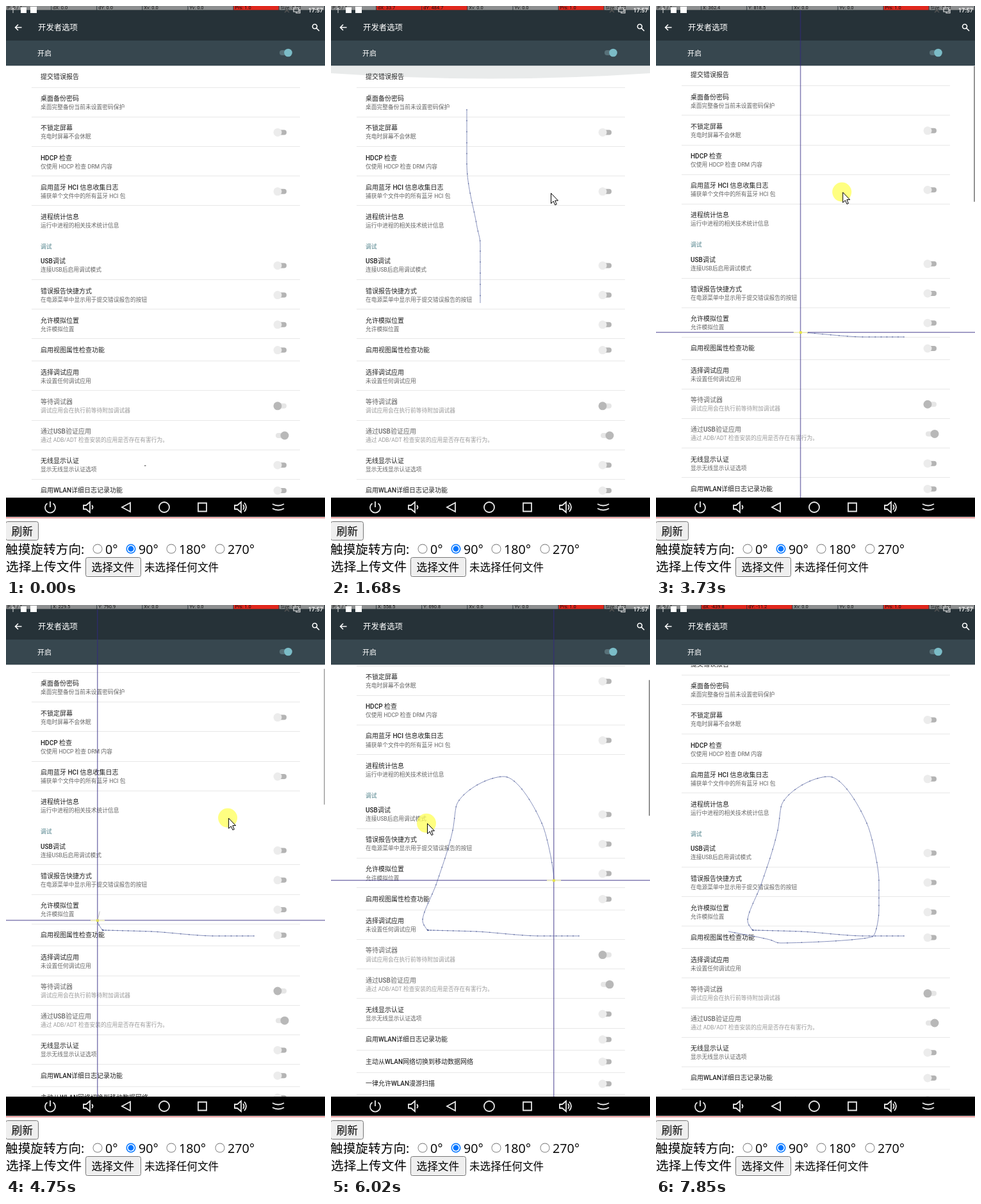
Recreate the animation shown at these times as an HTML page with a canvas. Size 498 by 892 pixels, loop 8.19 s.

```html
<!DOCTYPE html>
<html lang="zh-CN">
<head>
<meta charset="utf-8">
<style>
html, body { margin: 0; width: 100%; height: 100%; overflow: hidden; background: #fff; }
canvas { display: block; }
</style>
</head>
<body>
<canvas id="stage" width="498" height="892"></canvas>
<script>
const ctx = document.getElementById('stage').getContext('2d');
const LOOP = 8190, W = 498, H = 892;
const TOP = 92.6, ROW = 46.2, SHORT_ROW = 34.6, CATEGORY = 23.2;
const UI = 'Roboto, "Noto Sans CJK SC", "Noto Sans CJK", sans-serif';
const PAGE = '"Open Sans", "Noto Sans CJK SC", "Noto Sans CJK", sans-serif';

// Title, subtitle, switch; a lone string is a category
const items = [
  ['提交错误报告'],
  ['桌面备份密码', '桌面完整备份当前未设置密码保护'],
  ['不锁定屏幕', '充电时屏幕不会休眠', 'off'],
  ['HDCP 检查', '仅使用 HDCP 检查 DRM 内容'],
  ['启用蓝牙 HCI 信息收集日志', '捕获单个文件中的所有蓝牙 HCI 包', 'off'],
  ['进程统计信息', '运行中进程的相关技术统计信息'],
  '调试',
  ['USB调试', '连接USB后启用调试模式', 'off'],
  ['错误报告快捷方式', '在电源菜单中显示用于提交错误报告的按钮', 'off'],
  ['允许模拟位置', '允许模拟位置', 'off'],
  ['启用视图属性检查功能', '', 'off'],
  ['选择调试应用', '未设置任何调试应用'],
  ['等待调试器', '调试应用会在执行前等待附加调试器', 'wait'],
  ['通过USB验证应用', '通过 ADB/ADT 检查安装的应用是否存在有害行为。', 'on'],
  ['无线显示认证', '显示无线显示认证选项', 'off'],
  ['启用WLAN详细日志记录功能', '', 'off'],
  ['主动从WLAN网络切换到移动数据网络', '', 'off'],
  ['一律允许WLAN漫游扫描', '', 'off'],
  ['日志记录器缓冲区大小', '每个日志缓冲区256K'],
  '输入',
  ['显示触摸操作', '为触摸操作提供视觉反馈', 'off']
];

// Finger strokes as key points: time, x, y
const pull = [
  [700, 212, 162], [920, 212, 245], [1220, 228, 345], [1300, 233, 372], [1540, 233, 464]
];
const loop = [
  [3050, 387, 517], [3350, 326, 517], [3730, 226, 510], [4230, 151, 508],
  [4650, 151, 508], [4750, 143, 493], [4950, 165, 434], [5210, 190, 352],
  [5320, 197, 310], [5640, 270, 268], [5890, 330, 343], [6020, 348, 430],
  [6180, 348, 477], [6290, 338, 518], [6590, 194, 528], [6660, 178, 523],
  [6860, 113, 510]
];
const LAG = 95; // the device follows the mouse this late

const clamp = (v, a, b) => Math.max(a, Math.min(b, v));
const mix = (a, b, k) => a + (b - a) * k;
const first = keys => keys[0][0];
const last = keys => keys[keys.length - 1][0];

// Smooth interpolation that never overshoots its keys
function at(keys, t) {
  t = clamp(t, first(keys), last(keys));
  let i = 1;
  while (t > keys[i][0]) i++;
  const [a, b] = [keys[i - 1], keys[i]];
  const h = b[0] - a[0], k = (t - a[0]) / h;
  return [1, 2].map(axis => {
    const slope = n => {
      n = clamp(n, 1, keys.length - 1);
      return (keys[n][axis] - keys[n - 1][axis]) / (keys[n][0] - keys[n - 1][0]);
    };
    const tangent = n => {
      const p = slope(n), q = slope(n + 1);
      return p * q > 0 ? 2 * p * q / (p + q) : 0;
    };
    const bend = (1 - k) * (tangent(i - 1) * h * (1 - k) - tangent(i) * h * k);
    return mix(a[axis], b[axis], k * k * (3 - 2 * k)) + k * bend;
  });
}

function box(x, y, w, h, color) {
  ctx.fillStyle = color;
  ctx.fillRect(x, y, w, h);
}

function disc(x, y, r, color) {
  ctx.fillStyle = color;
  ctx.beginPath();
  ctx.arc(x, y, r, 0, 7);
  ctx.fill();
}

function line(path, color, width) {
  ctx.strokeStyle = color;
  ctx.lineWidth = width;
  ctx.stroke(new Path2D(path));
}

function pill(x, y, w, h, r, fill, border) {
  const path = new Path2D();
  path.roundRect(x, y, w, h, r);
  ctx.fillStyle = fill;
  ctx.fill(path);
  if (border) line(path, border, 1);
}

// y is the vertical middle of the glyphs
function text(s, x, y, size, color, weight = 400, family = UI) {
  ctx.font = `${weight} ${size}px ${family}`;
  ctx.fillStyle = color;
  ctx.fillText(s, x, y + size * 0.37);
}

function clipped(x, y, w, h, paint) {
  ctx.save();
  ctx.beginPath();
  ctx.rect(x, y, w, h);
  ctx.clip();
  paint();
  ctx.restore();
}

function toggle(y, state) {
  const off = state === 'off';
  pill(421, y - 4, 17, 8, 4, off ? '#b4b4b4' : '#e6e6e6');
  disc(state === 'on' ? 435 : 424, y, 6.5, off ? '#ececec' : '#b8b8b8');
}

function list(scroll) {
  let y = TOP - scroll;
  items.forEach((item, i) => {
    if (typeof item === 'string') {
      text(item, 54, y + 17.5, 8.75, '#4c7f88', 500);
      y += CATEGORY;
      return;
    }
    const [title, sub, state] = item;
    const dim = state === 'wait' || state === 'on';
    text(title, 54, y + 17.2, 10, dim ? '#666' : '#222', 500);
    if (sub) text(sub, 54, y + 30.7, 8.75, dim ? '#999' : '#666');
    if (state) toggle(y + (sub ? 24 : 17.6), state);
    y += sub ? ROW : SHORT_ROW;
    if (Array.isArray(items[i + 1])) box(40, Math.round(y - 0.5), 419, 1, '#e8e8e8');
  });
}

function header() {
  box(0, 0, W, 54, '#263238');
  box(0, 54, W, 39, '#37474f');
  box(0, 93, W, 1, '#c4c8ca');
  line('M24.500 33.500H15M19 29l-4.500 4.500 4.500 4.500', '#fff', 1.5);
  text('开发者选项', 50, 33, 12.4, '#fff', 500);
  text('开启', 49, 73.5, 11, '#fff', 500);
  line('M485.500 32a3.500 3.500 0 1 1-7 0a3.500 3.500 0 1 1 7 0M484.500 34.500l4.500 4.500', '#fff', 1.6);
  pill(427, 69, 16, 8, 4, '#587179');
  disc(440.5, 73, 6.3, '#7bbcc7');
}

function status(stroke, now, touching) {
  const value = axis => {
    const from = stroke && !touching ? stroke[0][axis + 1] : 0;
    return (touching ? '' : 'd') + 'XY'[axis] + ': ' + ((now[axis] - from) * 1.605).toFixed(1);
  };
  const cells = [`P: ${+touching} / 1`, value(0), value(1),
    'Xv: 0.0', 'Yv: 0.0', 'Prs: 1.0', 'Size: 0.02'];
  const released = stroke && !touching;
  clipped(0, 0, W, 6.5, () => cells.forEach((s, i) => {
    const red = i === 5 || (released && (i === 1 || i === 2));
    box(i * 71.1, 0, 70.2, 6.5, red ? '#e0281e' : '#8d8f90');
    text(s, i * 71.1 + 2, 2.2, 7.5, '#111');
  }));
  line('M11 3v8M8.500 6l2.500-3 2.500 3', '#ddd', 1);
  box(23, 2, 9, 9, '#fff');
  box(38, 1, 10, 10, '#fff');
  line('M435 4l7 6M442 4l-7 6', '#555', 1.5);
  line('M449 3h8v6h-8zM453 9v2h6V5', '#e4e4e4', 1.2);
  text('17:57', 472, 6.5, 9, '#fff', 500);
}

function navBar() {
  box(0, 768, W, 30, '#000');
  line('M64.500 777a8 8 0 1 0 9 0M69 774v9' +
    'M121 780h4l6-5v16l-6-5h-4zM134 780q3 3 0 6' +
    'M194 776v14l-13-7z' +
    'M255 783a8 8 0 1 1-16 0a8 8 0 1 1 16 0' +
    'M300 776.500h13v13h-13z' +
    'M357 780h4l6-5v16l-6-5h-4zM370 779q3 4 0 8M372 776q6 7 0 14' +
    'M416 778q9 5 18 0M416 785q9 5 18 0', '#e8e8e8', 1.8);
}

function form() {
  const put = (s, x, y, size = 19.7) => text(s, x, y, size, '#000', 400, PAGE);
  const button = (s, x, y, w, h, size) => {
    pill(x, y, w, h, 3, '#efefef', '#767676');
    put(s, x + 9, y + h / 2 + 0.3, size);
  };
  const radio = (s, x, on) => {
    disc(x, 848, 7.5, on ? '#0075ff' : '#767676');
    disc(x, 848, on ? 6 : 6.6, '#fff');
    if (on) disc(x, 848, 4.4, '#0075ff');
    put(s, x + 12, 849);
  };
  box(0, 798, W, 94, '#fff');
  box(0, 799, W, 1, '#d04848');
  button('刷新', -0.5, 805.5, 51, 29, 16.8);
  put('触摸旋转方向:', -1, 849);
  radio('0°', 143);
  radio('90°', 195, true);
  radio('180°', 258);
  radio('270°', 334);
  put('选择上传文件', 0, 876);
  button('选择文件', 124.5, 861.5, 86, 30, 16.7);
  put('未选择任何文件', 216, 877, 16.6);
}

// Overscroll glow grows with the pull and fades after release
function glow(t) {
  const drag = clamp((at(pull, t)[1] - 162) / 120, 0, 1);
  const amount = drag * clamp((2200 - t) / 500, 0, 1);
  ctx.fillStyle = 'rgba(55,71,79,.11)';
  ctx.fill(new Path2D(`M0 93v${12 * amount}Q249 ${93 + 29 * amount} ${W} ${93 + 12 * amount}V93z`));
}

function scrollbar(t, scroll) {
  const fade = (from, to) => clamp((t - from) / 150, 0, 1) * clamp((to - t) / 180, 0, 1);
  const alpha = Math.max(fade(3400, 4440), fade(4650, 7400));
  box(496, 93 + scroll * 0.31, 2, 212, `rgba(150,150,150,${alpha})`);
}

function trace(keys, t) {
  const path = new Path2D(), end = Math.min(t, last(keys));
  for (let s = first(keys); s < end; s += 15) path.lineTo(...at(keys, s));
  path.lineTo(...at(keys, end));
  line(path, '#8791bd', 1);
  for (let s = first(keys); s <= end; s += 45) {
    const [x, y] = at(keys, s);
    box(x - 0.7, y - 0.7, 1.4, 1.4, '#5c689c');
  }
}

function crosshair([x, y], [aheadX, aheadY]) {
  const color = 'rgba(50,40,130,.6)';
  box(x - 1, 7, 1.5, 761, color);
  box(0, y - 1, W, 1.5, color);
  box(x - 11, y - 1, 22, 2, '#f0efc0');
  box(x - 2, y - 2, 4, 4, '#e6e34a');
  if (aheadY < y - 10) line(`M${x} ${y}L${aheadX} ${aheadY}`, '#bbb', 1);
}

// The mouse drags on a view turned by half a circle
function mouse(t) {
  const turned = (keys, time) => {
    const [x, y] = at(keys, time);
    return [W - x, 800 - y];
  };
  const drag = t + LAG;
  if (drag > first(loop)) {
    const from = turned(loop, drag);
    const k = clamp((t - 7220) / 600, 0, 1);
    return [mix(from[0], 260, k), mix(from[1], H, k)];
  }
  if (drag > last(pull)) {
    return at([[last(pull) - LAG, ...turned(pull, drag)], [1680, 343, 292],
      [1780, 343, 292], [2520, 150, 285], [first(loop) - LAG, ...turned(loop, 0)]], t);
  }
  return drag > first(pull) ? turned(pull, drag)
    : at([[40, 215, 858], [first(pull) - LAG, ...turned(pull, 0)]], t);
}

function cursor(t) {
  if (t < 40 || t > 7820) return;
  const [x, y] = mouse(t);
  const held = [pull, loop].some(k => t + LAG > first(k) && t + LAG < last(k));
  if (held) disc(x - 1, y, 15, 'rgba(255,255,80,.72)');
  ctx.save();
  ctx.translate(x, y);
  const arrow = new Path2D('M.5.500V16.500L4.200 13 6.800 18.800 9.200 17.800 6.700 12H11.500z');
  ctx.fillStyle = '#fff';
  ctx.fill(arrow);
  line(arrow, '#000', 1);
  ctx.restore();
}

function render(t) {
  const stroke = [loop, pull].find(keys => t >= first(keys));
  const touching = !!stroke && t < last(stroke);
  const now = stroke ? at(stroke, t) : [0, 0];
  // The list follows the finger and re-anchors where it turns back at the top
  const anchor = t > 6590 ? 528 : 512.5;
  const scroll = stroke === loop ? Math.max(0, anchor - at(loop, t + 10)[1]) : 0;

  box(0, 0, W, H, '#fff');
  clipped(0, 93, W, 675, () => list(scroll));
  glow(t);
  scrollbar(t, scroll);
  header();
  status(stroke, now, touching);
  navBar();
  if (stroke) trace(stroke, t);
  else box(216, 717.5, 2.5, 1.2, '#555');
  if (touching) crosshair(now, at(stroke, t + 58));
  form();
  cursor(t);
}

const start = performance.now();
function tick() {
  render((performance.now() - start) % LOOP);
  requestAnimationFrame(tick);
}
tick();
</script>
</body>
</html>
```
